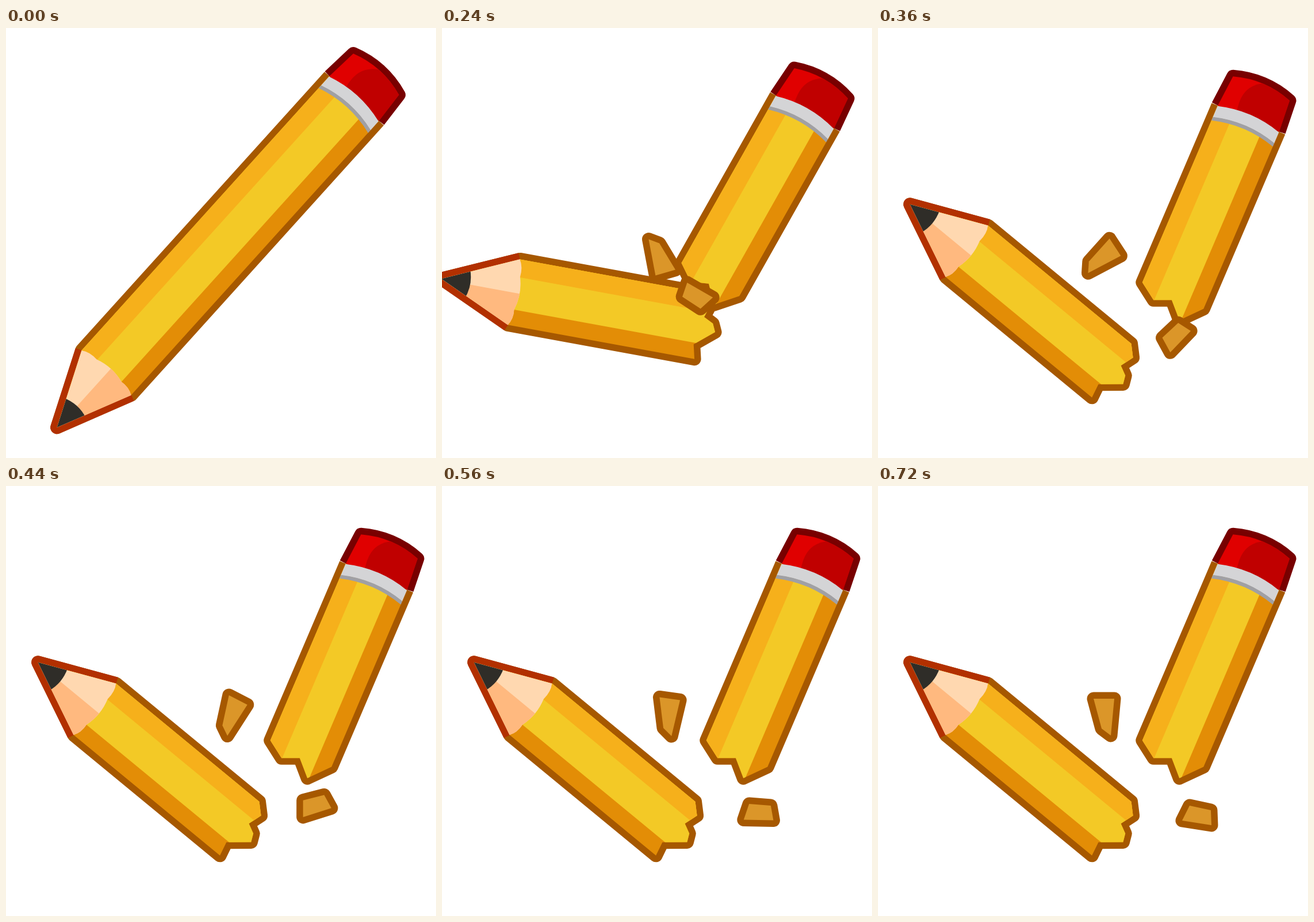
An HTML page with a canvas for the animation above (2000 ms loop, 748 by 748 pixels).

```html
<!DOCTYPE html>
<html lang="en">
<head>
<meta charset="utf-8">
<title>Breaking pencil</title>
<style>
  html, body { margin: 0; width: 100%; height: 100%; overflow: hidden; background: #fff; }
  canvas { display: block; width: 100vw; height: 100vh; }
</style>
</head>
<body>
<canvas id="stage" width="748" height="748"></canvas>
<script>
const ctx = document.getElementById('stage').getContext('2d');

const LOOP = 2000, SNAP = 200, STEP = 40, LAST = 13;
const SWING = 3;      // steps the two halves need to fall apart
const DAMP = 0.71;    // part of the chips' motion left after each step
const RIM = 11.5, HALF = 58, LENGTH = 645;
const BROWN = '#a65800', RUST = '#b23000', MAROON = '#780000';

const path = d => new Path2D(d);

// Local axes: x runs from the point to the eraser, y from the lit to the shaded side.
const nib = `2.5 ${-HALF}L-126 0L2.5 ${HALF}`;
const whole = path(`M${LENGTH} ${-HALF}L${nib}L${LENGTH} ${HALF}`);
const lower = path(`M${nib}L332 ${HALF}L326 33L359 5.5L352.5 -8.5L335.5 -17L343 -41L325 ${-HALF}Z`);
const upper = path(`M0 ${-HALF}L-334.5 ${-HALF}L-355 -28L-342.5 1L-369.5 27L-335 ${HALF}L0 ${HALF}`);

const coneEdge = path(`M${nib}`);
const wood = path('M-126 0L2 -58Q10 -46 8 -28Q17 1 8 30Q10 46 2 58Z');
const lead = path('M-140 0L-80 -26Q-70 1 -80 26Z');

const eraser = path('M0 -58L57 -53.5Q75 0 57 53.5L0 58');
const eraserShade = path('M-5 -21Q30 -32 50 -19Q62 -11 68 2L90 70L-5 70Z');

// A curved ring across the barrel between two distances.
const ring = (a, b) =>
  path(`M${a} ${-HALF}Q${a + 17} 0 ${a} ${HALF}L${b} ${HALF}Q${b + 17} 0 ${b} ${-HALF}Z`);
const ferrule = ring(-1, -22);
const ferruleShade = ring(-21.5, -28);

const chipA = path('M-20 -29L16 -29L10 35L-6 23Z');
const chipB = path('M-15 -17L22 -9L23 17L-28 9Z');

function fill(shape, color) {
  ctx.fillStyle = color;
  ctx.fill(shape);
}

// The rim lies behind the fill, so only its outer half shows.
function rim(shape, color) {
  ctx.strokeStyle = color;
  ctx.stroke(shape);
}

function clipped(shape, paint) {
  ctx.save();
  ctx.clip(shape);
  paint();
  ctx.restore();
}

function place(x, y, angle, paint) {
  ctx.save();
  ctx.translate(x, y);
  ctx.rotate(angle * Math.PI / 180);
  paint();
  ctx.restore();
}

function band(color, top, bottom) {
  ctx.fillStyle = color;
  ctx.fillRect(-400, top, 1100, bottom - top);
}

function barrel(shape) {
  clipped(shape, () => {
    band('#e38d06', -70, 70);
    band('#f3c926', -70, 30);
    band('#f6b01b', -70, -27);
  });
}

function point() {
  fill(wood, '#ffd8b0');
  clipped(wood, () => {
    band('#ffb97f', 1, 70);
    fill(lead, '#2f2d28');
  });
}

function cap() {
  rim(eraser, MAROON);
  fill(eraser, '#e00000');
  clipped(eraser, () => fill(eraserShade, '#c00000'));
  fill(ferrule, '#d4d4d6');
  fill(ferruleShade, '#a0a0a4');
}

function drawWhole() {
  rim(whole, BROWN);
  rim(coneEdge, RUST);
  barrel(whole);
  point();
  place(LENGTH, 0, 0, cap);
}

function drawLower() {
  rim(lower, BROWN);
  rim(coneEdge, RUST);
  barrel(lower);
  point();
}

function drawUpper() {
  rim(upper, BROWN);
  barrel(upper);
  cap();
}

function drawChip(shape) {
  rim(shape, BROWN);
  fill(shape, '#db9629');
}

const mix = (a, b, f) => a + (b - a) * f;

function render(time) {
  ctx.fillStyle = '#fff';
  ctx.fillRect(0, 0, 748, 748);
  ctx.lineWidth = 2 * RIM;
  ctx.lineJoin = 'round';
  if (time < SNAP) {
    place(173.2, 601.3, -47.9, drawWhole);
    return;
  }
  const n = Math.min(LAST, Math.floor((time - SNAP) / STEP));
  const swing = Math.min(1, (n + 1) / SWING);
  const end = DAMP ** LAST;
  const left = (DAMP ** n - end) / (1 - end);

  // The lower half turns about a point inside its barrel.
  place(276.6, 480.5, mix(-47.9, 39.5, swing), () => place(-155, 6.5, 0, drawLower));
  place(mix(605.5, 644.4, swing), mix(122.5, 157.7, swing), mix(-47.9, -66.9, swing), drawUpper);
  place(395 - 23 * left, 399 - left, 232 * left, () => drawChip(chipA));
  place(557 - 163 * left, 573 - 150 * left, -225 * left, () => drawChip(chipB));
}

const start = performance.now();
function tick() {
  render((performance.now() - start) % LOOP);
  requestAnimationFrame(tick);
}
tick();
</script>
</body>
</html>
```
